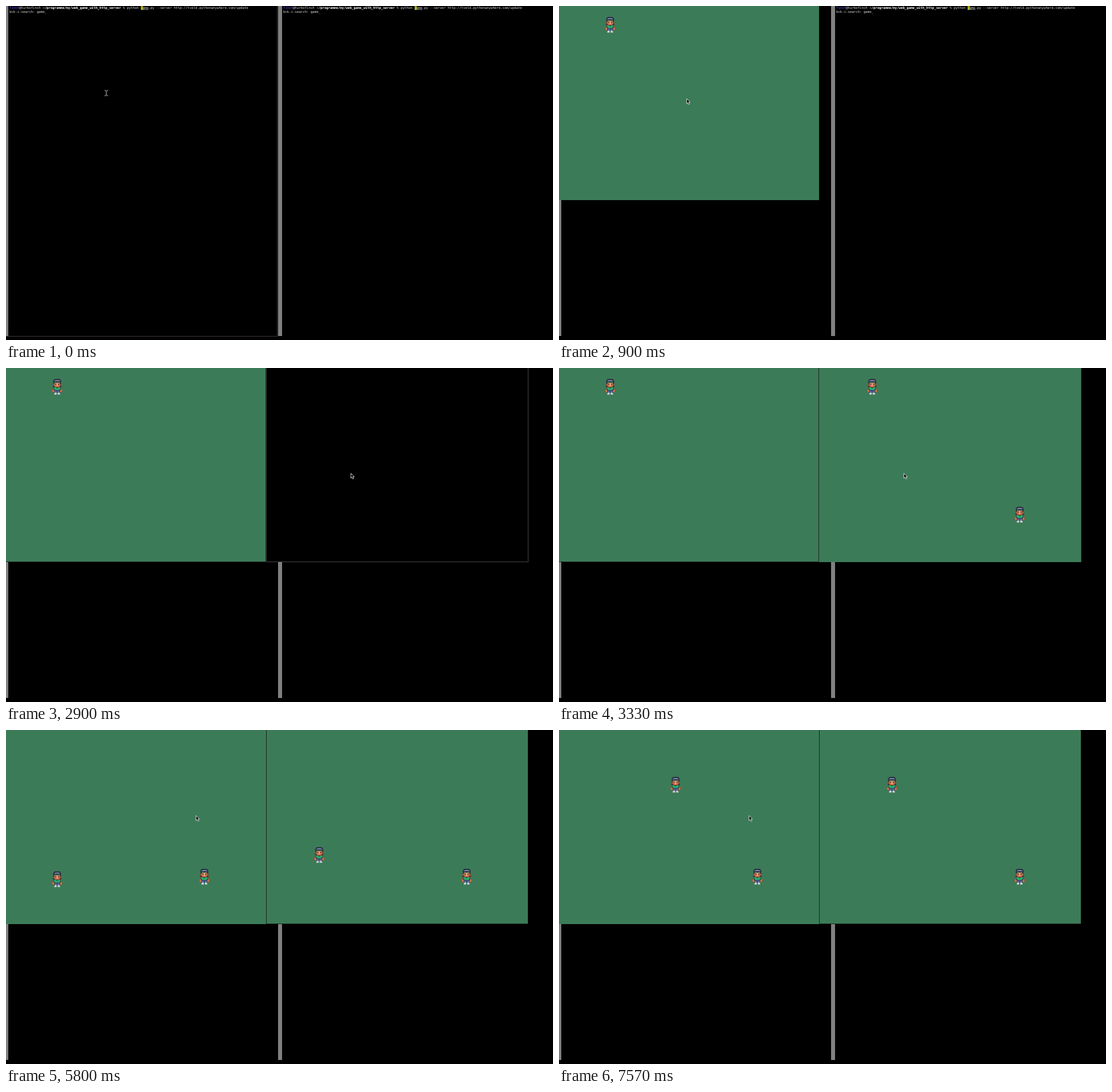
An HTML page for the animation above (8000 ms loop, 957 px wide and 585 px high).

```html
<!DOCTYPE html>
<html lang="en">
<head>
<meta charset="utf-8">
<title>Networked game in two windows</title>
<style>
html, body { margin: 0; width: 100%; height: 100%; overflow: hidden; background: #000; }
svg { display: block; width: 957px; height: 585px; }

text {
  font: 5.7px "DejaVu Sans Mono", "Liberation Mono", monospace;
  text-rendering: geometricPrecision;
  white-space: pre;
  fill: #e2e2e2;
}
.user { fill: #5a5aff; }
.path { font-weight: bold; fill: #fff; }
.bar { fill: #808080; }
.focus { fill: #40343f; }
.grass { fill: #3c7b58; }
.edge { fill: #18231d; }
.frame { fill: #444; }

/* Everything changes in hard steps on one 8 s clock. */
.t { animation: 8s step-end -1ms infinite; }
.leftFocus { animation-name: leftFocus; }
.leftSearch { animation-name: leftSearch; }
.leftRun { animation-name: leftRun; }
.leftGame { animation-name: leftGame; }
.leftEdge { animation-name: leftEdge; }
.rightFocus { animation-name: rightFocus; }
.rightSearch { animation-name: rightSearch; }
.rightRun { animation-name: rightRun; }
.rightWindow { animation-name: rightWindow; }
.rightGame { animation-name: rightGame; }
.synced { animation-name: synced; }
.arrow { animation-name: arrow; }
.beam { animation-name: beam; }
.leftHero { animation-name: leftHero; }
.rightHero { animation-name: rightHero; }

@keyframes leftFocus { 0% { opacity: 1 } 11.25%, 100% { opacity: 0 } }
@keyframes leftSearch { 0% { opacity: 1 } 6.25%, 100% { opacity: 0 } }
@keyframes leftRun { 0% { opacity: 0 } 6.25%, 100% { opacity: 1 } }
@keyframes leftGame { 0% { opacity: 0 } 11.25%, 100% { opacity: 1 } }
@keyframes leftEdge { 0% { opacity: 0 } 16.625% { opacity: 1 } 46.625%, 100% { opacity: 0 } }
@keyframes rightFocus { 0% { opacity: 0 } 16.625% { opacity: 1 } 36.25%, 100% { opacity: 0 } }
@keyframes rightSearch { 0% { opacity: 1 } 27.875%, 100% { opacity: 0 } }
@keyframes rightRun { 0% { opacity: 0 } 27.875%, 100% { opacity: 1 } }
@keyframes rightWindow { 0% { opacity: 0 } 36.25%, 100% { opacity: 1 } }
@keyframes rightGame { 0% { opacity: 0 } 41.625%, 100% { opacity: 1 } }
@keyframes synced { 0% { opacity: 0 } 46.625%, 100% { opacity: 1 } }

@keyframes beam {
  0% { opacity: 1; transform: translate(175.5px, 152.5px) }
  6.25% { opacity: 1; transform: translate(273.5px, 152px) }
  11.25% { opacity: 0; transform: translate(273.5px, 152px) }
  16.625% { opacity: 1; transform: translate(585px, 178px) }
  27.875% { opacity: 1; transform: translate(603px, 183.5px) }
  36.25%, 100% { opacity: 0; transform: translate(603px, 183.5px) }
}
@keyframes arrow {
  0% { opacity: 0; transform: translate(223px, 162px) }
  11.25% { opacity: 1; transform: translate(223px, 162px) }
  16.625% { opacity: 0; transform: translate(603px, 184px) }
  36.25% { opacity: 1; transform: translate(603px, 184px) }
  46.625%, 100% { opacity: 1; transform: translate(332px, 149.5px) }
}
@keyframes leftHero {
  0% { transform: translate(80px, 19px) }
  56.625% { transform: translate(80px, 33.3px) }
  61.625% { transform: translate(80px, 101px) }
  66.625% { transform: translate(80px, 170px) }
  72.5% { transform: translate(80px, 247.5px) }
  77.875% { transform: translate(80px, 199px) }
  83.375% { transform: translate(80px, 125px) }
  89.125% { transform: translate(120px, 82px) }
  94.625%, 100% { transform: translate(194.5px, 82px) }
}
/* The other client lags behind. */
@keyframes rightHero {
  0% { transform: translate(538.5px, 19px) }
  66.625% { transform: translate(538.5px, 90px) }
  72.5% { transform: translate(538.5px, 205px) }
  77.875% { transform: translate(538.5px, 242px) }
  83.375% { transform: translate(538.5px, 199px) }
  89.125% { transform: translate(538.5px, 87px) }
  94.625%, 100% { transform: translate(573px, 82px) }
}
</style>
</head>
<body>
<svg viewBox="0 0 957 585">
  <defs>
    <g id="hero">
      <!-- arms and hair -->
      <path fill="#8f4a38" d="M2 16h3v8h-2l-2-1-1-3zM17 16h-3v8h2l2-1 1-3z"/>
      <path fill="#cf7a4c" d="M2 18h2v5h-2l-1-2zM17 18h-2v5h2l1-2z"/>
      <path fill="#4b3236" d="M3 7h13l1 3v4l-2 1h-11l-2-1v-4z"/>
      <path fill="#a5603f" d="M2.5 9h2v3h-2zM14.5 9h2v3h-2z"/>
      <!-- face -->
      <path fill="#d58a5c" d="M5 7h9v6l-2 2h-5l-2-2z"/>
      <path fill="#3a2c30" d="M6 8.5h2v1.8h-2zM11 8.5h2v1.8h-2z"/>
      <path fill="#d95f3a" d="M6 11h7v2l-1.5 2h-4l-1.5-2z"/>
      <path fill="#f0c7a4" d="M8 11.5h3v1.2h-3zM8.8 8h1.4v2.5h-1.4z"/>
      <!-- cap -->
      <path fill="#2c3447" d="M6 0h7l2 1 1.5 2.5v3.5h-2l-1-1h-8l-1 1h-2v-3.500l1.500-2.500z"/>
      <path fill="#91a4b8" d="M5 3.500l2-1h5l2 1v1.300l-2-.8h-5l-2 .8z"/>
      <!-- shirt, trousers, shoes -->
      <path fill="#24553f" d="M4 14.500h11l1.500 3-1.500 3h-11l-1.500-3z"/>
      <path fill="#27b275" d="M4.500 15h2.500l1 1.500h3l1-1.500h2.500l1 2-2 .8v1.700h-8v-1.700l-2-.8z"/>
      <path fill="#3f4c7d" d="M5 20h9v4.500h-3.500l-1-1.500-1 1.500h-3.500z"/>
      <path fill="#7887b8" d="M6 22h2v2.500h-2zM11 22h2v2.500h-2z"/>
      <path fill="#d9dde4" d="M5.500 24.500h3v3h-4v-1.500zM13.500 24.500h-3v3h4v-1.500z"/>
    </g>

    <g id="command">
      <text y="4.600"><tspan class="user">finch</tspan>@turbofinch <tspan class="path">~/programme/my/web_game_with_http_server</tspan> % python game.py --server http://tveld.pythonanywhere.com/update</text>
    </g>
    <g id="search">
      <rect x="229.900" y="0" width="4" height="6.500" fill="#cdcd00" opacity=".75"/>
      <rect x="229.900" y="5.700" width="13.700" height=".7" fill="#e2e2e2"/>
      <text y="12">bck-i-search: game_</text>
    </g>
    <g id="run">
      <text y="12">pygame 1.9.6</text>
      <text y="19.400">Hello from the pygame community. https://www.pygame.org/contribute.html</text>
      <text y="26.800">_</text>
    </g>
  </defs>

  <!-- terminals -->
  <rect class="bar" width="4" height="578"/>
  <rect class="bar" x="476" width="7" height="578"/>
  <path class="t leftFocus focus" d="M474 0h1v579h-475v-1h474z"/>
  <path class="t rightFocus focus" d="M956 0h1v579h-481v-1h480z"/>
  <g transform="translate(6 0)">
    <use href="#command"/>
    <use class="t leftSearch" href="#search"/>
    <use class="t leftRun" href="#run"/>
  </g>
  <g transform="translate(485 0)">
    <use href="#command"/>
    <use class="t rightSearch" href="#search"/>
    <use class="t rightRun" href="#run"/>
  </g>

  <!-- first game window -->
  <g class="t leftGame">
    <rect class="grass" width="455" height="340"/>
    <path class="t leftEdge edge" d="M454 0h1v340h-455v-1h454z"/>
    <use class="t leftHero" href="#hero"/>
    <g class="t synced"><use href="#hero" x="337.500" y="243"/></g>
  </g>

  <!-- second game window -->
  <g class="t rightWindow">
    <rect class="frame" x="455" width="459" height="340"/>
    <rect x="456" width="457" height="339"/>
    <g class="t rightGame">
      <rect class="grass" x="455" width="458" height="340"/>
      <path class="t synced edge" d="M455 0h1v339h457v1h-458z"/>
      <rect class="t synced" x="913" width="1" height="340"/>
      <use class="t rightHero" href="#hero"/>
      <use href="#hero" x="796.500" y="243"/>
    </g>
  </g>

  <!-- pointers -->
  <path class="t beam" fill="none" stroke="#ddd" stroke-width="1" d="M-3-4.500h2l1 1 1-1h2M-3 4.500h2l1-1 1 1h2M0-3.500v7"/>
  <path class="t arrow" fill="#000" stroke="#fff" stroke-width=".8" d="M.4.400v8.600l1.900-1.800 1.600 3.200 1.500-.7-1.500-3.100h2.500z"/>
</svg>
</body>
</html>
```
